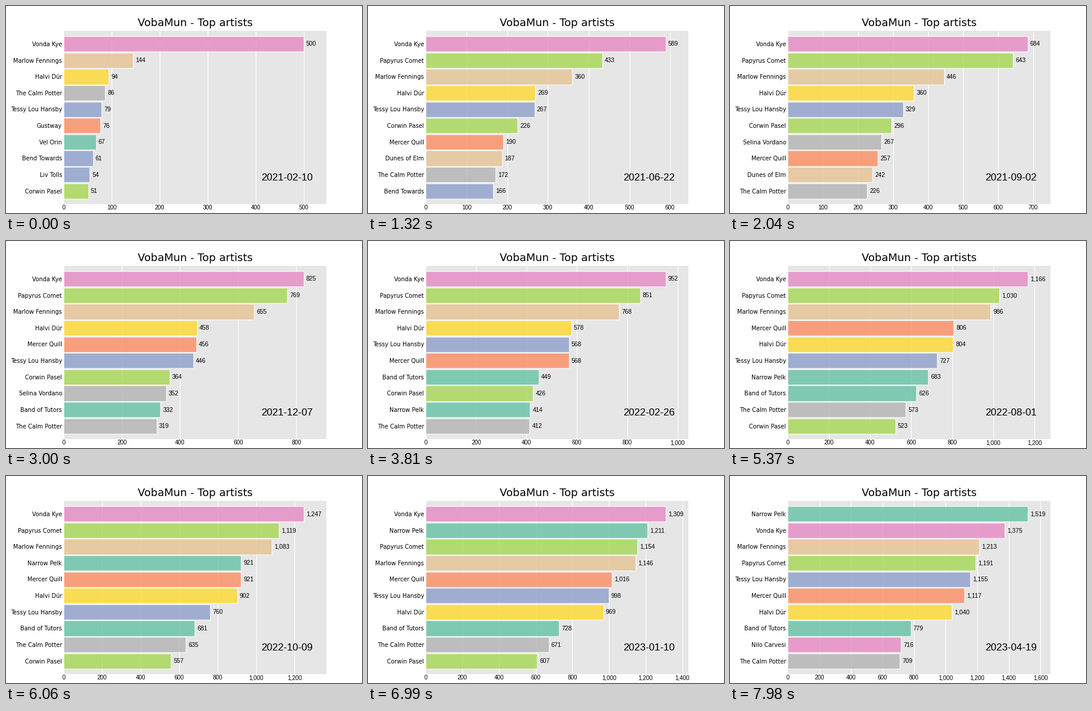
A matplotlib script that plays this animation: 600 by 350 pixels, repeating every 8000 ms.

```python
import numpy as np
import matplotlib.pyplot as plt
from matplotlib.animation import FuncAnimation
from matplotlib.patches import Rectangle

W, H, DPI = 600, 350, 100
LEFT, TOP, WIDTH, HEIGHT = 97, 42, 443, 293
ROWS = 10
PITCH = HEIGHT / (ROWS + 0.6)
HEADROOM = 1.096
START = np.datetime64("2021-02-10")
DAYS = 3
FRAMES, INTERVAL, STEP_MS = 400, 20, 30

GREEN, ORANGE, BLUE, PINK, LIME, YELLOW, TAN, GREY = plt.get_cmap("Set2").colors

# Play counts at a few steps; in between they grow evenly.
KEYS = [0, 44, 68, 100, 154, 202, 266]
ARTISTS = [
    ("Vonda Kye", PINK, [500, 589, 684, 825, 1079, 1247, 1375]),
    ("Marlow Fennings", TAN, [144, 360, 446, 655, 880, 1083, 1213]),
    ("Halvi Dúr", YELLOW, [94, 269, 360, 458, 698, 902, 1040]),
    ("The Calm Potter", GREY, [86, 172, 226, 319, 506, 635, 709]),
    ("Tessy Lou Hansby", BLUE, [79, 267, 329, 446, 691, 760, 1155]),
    ("Gustway", ORANGE, [76, 150, 185]),
    ("Vel Orin", GREEN, [67, 140, 170]),
    ("Bend Towards", BLUE, [61, 166, 205]),
    ("Liv Tolls", BLUE, [54, 125, 150]),
    ("Corwin Pasel", LIME, [51, 226, 296, 364, 487, 557, 660]),
    ("Papyrus Comet", LIME, [30, 433, 643, 769, 933, 1119, 1191]),
    ("Narrow Pelk", GREEN, [0, 40, 120, 240, 589, 921, 1519]),
    ("Mercer Quill", ORANGE, [20, 190, 257, 456, 680, 921, 1117]),
    ("Dunes of Elm", TAN, [20, 187, 242, 305, 400, 480]),
    ("Selina Vordano", GREY, [0, 150, 267, 352, 430, 500]),
    ("Band of Tutors", GREEN, [0, 110, 190, 332, 566, 681, 779]),
    ("Nilo Carvesi", PINK, [0, 20, 60, 140, 300, 450, 716]),
]
BENDS = {"Narrow Pelk": (190, 725), "Tessy Lou Hansby": (243, 1075)}


def count(name, values, step):
    points = list(zip(KEYS, values))
    if name in BENDS:
        points = sorted(points + [BENDS[name]])
    xs, ys = zip(*points)
    return int(round(np.interp(step, xs, ys)))


fig = plt.figure(figsize=(W / DPI, H / DPI), dpi=DPI, facecolor="white")
ax = fig.add_axes([0, 0, 1, 1])
ax.set_xlim(0, W)
ax.set_ylim(H, 0)
ax.axis("off")


def label(x, y, px, ha, font="Liberation Sans", text=""):
    return ax.text(x, y, text, fontsize=px * 72 / DPI, family=font,
                   ha=ha, va="baseline", color="black", zorder=5)


ax.add_patch(Rectangle((LEFT, TOP), WIDTH, HEIGHT, fc="0.9", ec="none", zorder=0))
label(LEFT + WIDTH / 2, 34.5, 18, "center", "DejaVu Sans", "VobaMun - Top artists")
date = label(517, 295, 17, "right")

grid = [ax.plot([0, 0], [TOP, TOP + HEIGHT], color="white", lw=0.8,
                solid_capstyle="butt", zorder=1)[0] for _ in range(10)]
ticks = [label(0, 344.3, 9.9, "center") for _ in grid]

bars, names, values = [], [], []
for row in range(ROWS):
    y = TOP + (row + 0.8) * PITCH
    bar = Rectangle((LEFT + 0.4, y - 0.475 * PITCH), 1, 0.95 * PITCH,
                    ec="white", lw=1, alpha=0.8, zorder=2)
    bars.append(ax.add_patch(bar))
    names.append(label(94.5, y + 3.8, 9.8, "right", "DejaVu Sans"))
    values.append(label(0, y + 3.3, 10.2, "left"))


def draw(frame):
    step = (frame * INTERVAL + INTERVAL // 2) // STEP_MS
    ranking = [(count(name, vals, step), name, color) for name, color, vals in ARTISTS]
    ranking.sort(key=lambda item: -item[0])
    limit = ranking[0][0] * HEADROOM
    scale = WIDTH / limit

    gap = 100 if limit <= 900 else 200
    for i, (line, tick) in enumerate(zip(grid, ticks)):
        x = LEFT + 0.4 + i * gap * scale
        shown = i * gap <= limit
        line.set_visible(shown)
        tick.set_visible(shown)
        line.set_xdata([x, x])
        tick.set_x(x)
        tick.set_text(f"{i * gap:,}")

    for bar, name, value, (n, artist, color) in zip(bars, names, values, ranking):
        bar.set_width(n * scale)
        bar.set_facecolor(color)
        name.set_text(artist)
        value.set_x(LEFT + 4.6 + n * scale)
        value.set_text(f"{n:,}")

    date.set_text(str(START + DAYS * step))
    return []


anim = FuncAnimation(fig, draw, frames=FRAMES, interval=INTERVAL,
                     init_func=lambda: draw(0), repeat=True, repeat_delay=0)
plt.show()
```
